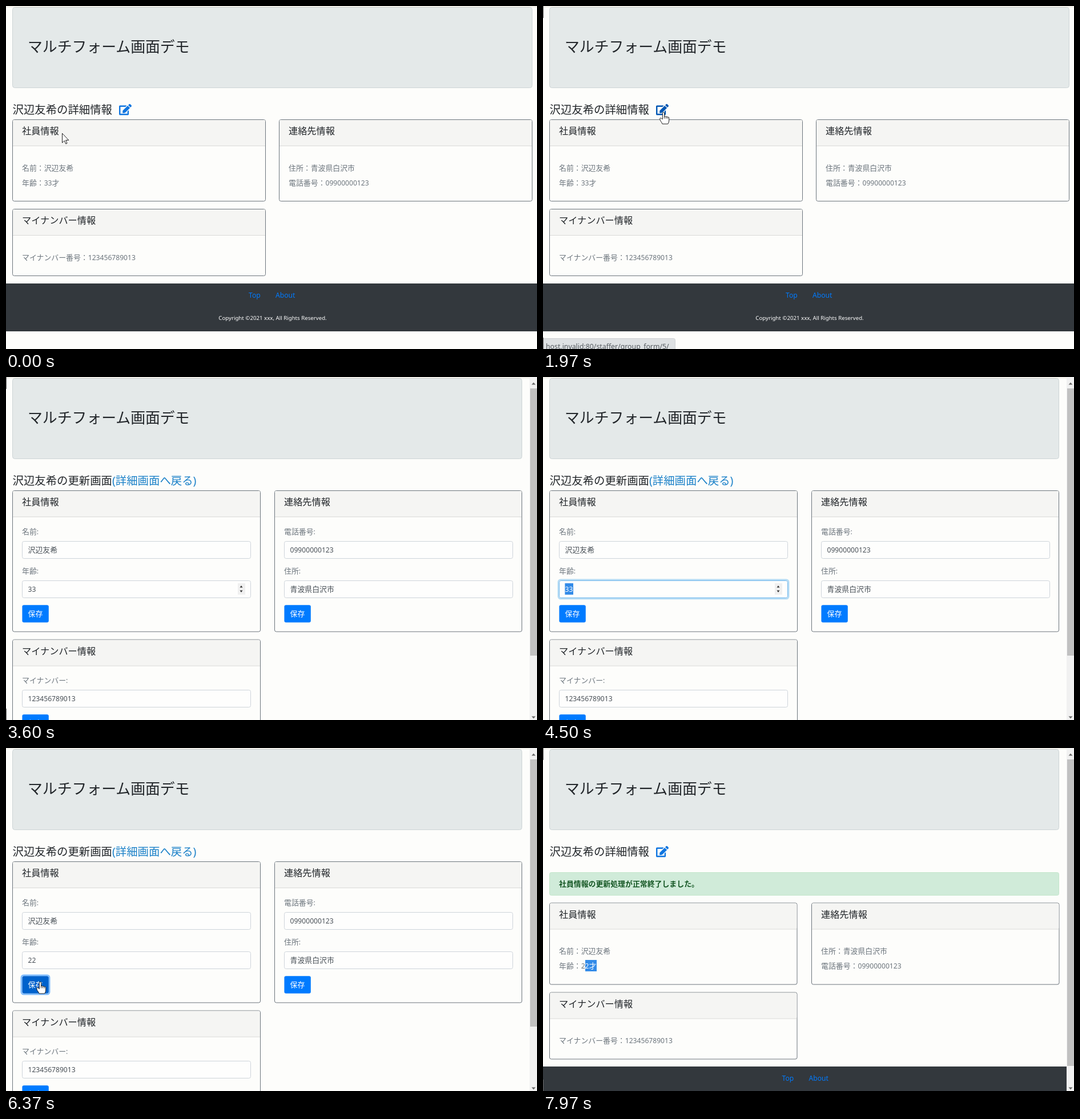
Animation of 930 by 602 pixels, one loop 8000 ms. Source, as an HTML page:

```html
<!DOCTYPE html>
<html lang="ja">
<head>
<meta charset="utf-8">
<style>
html, body { margin: 0; width: 930px; height: 602px; overflow: hidden; background: #fdfdfb; }
svg { display: block; }
text { font-family: "Noto Sans", "Noto Sans CJK JP", "Noto Sans CJK", sans-serif; white-space: pre; }
.latin { font-size: .94em; }
.light { font-weight: 300; }
</style>
</head>
<body>
<svg id="stage" width="930" height="602" viewBox="0 0 930 602"></svg>
<script>
const LOOP = 8000;
const PERSON = '沢辺友希', PHONE = '09900000123', PLACE = '青波県白沢市', NUMBER = '123456789013';
const INK = '#212529', GRAY = '#6c757d', FIELD = '#495057', BLUE = '#007bff', LINK = '#1a80c8';
const H1 = 25.85, H3 = 19.4, H5 = 16.2, BODY = 12.9;

// Latin runs are set slightly smaller than the kana and kanji around them.
const mix = s => s.replace(/[ -~©]+/g, m => `<tspan class="latin">${m}</tspan>`);
const text = (x, cy, size, s, fill = INK, attrs = '') =>
  `<text x="${x}" y="${cy + size * .37}" font-size="${size}" fill="${fill}" ${attrs}>${mix(s)}</text>`;
const rect = (x, y, w, h, fill, attrs = '') =>
  `<rect x="${x}" y="${y}" width="${w}" height="${h}" fill="${fill}" ${attrs}/>`;
const box = (x, y, w, h, fill, line, r = 3) =>
  rect(x + .5, y + .5, w - 1, h - 1, fill, `stroke="${line}" rx="${r}"`);
const group = (id, body, attrs = '') => `<g id="${id}" ${attrs}>${body}</g>`;

function card(x, y, w, h, title) {
  return box(x, y, w, h, '#fdfdfb', '#6c757d') +
    rect(x + 1, y + 1, w - 2, 45, '#f5f5f3', 'rx="2"') +
    rect(x + 1, y + 46, w - 2, 1, '#d9d9d8') +
    text(x + 17, y + 20.5, H5, title);
}

function header(right) {
  return rect(0, 0, 930, 602, '#fdfdfb') + rect(0, 1, 930, 1, '#e6e2d8') +
    box(11, 2, right - 11, 142, '#e4e9e9', '#cdd4d6', 4) +
    text(38, 71, H1, 'マルチフォーム画面デモ', INK, 'class="light"');
}

function footer(y, width) {
  const mid = width / 2;
  return rect(0, y, width, 84, '#33383d') +
    text(mid - 40, y + 20, BODY, 'Top', BLUE) +
    text(mid + 7, y + 20, BODY, 'About', BLUE) +
    text(mid + 2, y + 60, 10.3, 'Copyright ©2021 xxx, All Rights Reserved.', '#fff', 'text-anchor="middle"');
}

function scrollbar(end) {
  return rect(917, 0, 13, 602, '#f1f1f1') + rect(918, 20, 12, end - 20, '#c1c1c1') +
    '<path d="M920.5 13.500h7l-3.500-4zM920.5 595.500h7l-3.500 4z" fill="#6a6a6a"/>';
}

const editIcon = id => `<path id="${id}" transform="translate(198 172) scale(.0382)" fill="#0f75e0"
  d="M402.6 83.2l90.2 90.2c3.8 3.8 3.8 10 0 13.8L274.4 405.6l-92.8 10.3c-12.4 1.4-22.9-9.1-21.5-21.5l10.3-92.8L388.8 83.2c3.8-3.8 10-3.8 13.8 0zm162-22.9l-48.8-48.8c-15.2-15.2-39.9-15.2-55.2 0l-35.4 35.4c-3.8 3.8-3.8 10 0 13.8l90.2 90.2c3.8 3.8 10 3.8 13.8 0l35.4-35.4c15.2-15.3 15.2-40 0-55.2zM384 346.2V448H64V128h229.800c3.2 0 6.2-1.3 8.5-3.5l40-40c7.6-7.6 2.2-20.5-8.5-20.5H48C21.5 64 0 85.500 0 112v352c0 26.500 21.500 48 48 48h352c26.500 0 48-21.500 48-48V306.200c0-10.700-12.900-16-20.500-8.500l-40 40c-2.200 2.300-3.500 5.300-3.500 8.500z"/>`;

function detail(id, right, col, w, dy, age) {
  const x2 = col + 17;
  return header(right) +
    text(11.5, 182, H3, PERSON + 'の詳細情報', INK, 'class="light"') + editIcon(id + 'Icon') +
    card(11, 199 + dy, w, 144, '社員情報') +
    text(28, 284 + dy, BODY, '名前：' + PERSON, GRAY) +
    text(28, 310 + dy, BODY, `年齢：${age}才`, GRAY) +
    card(col, 199 + dy, w, 144, '連絡先情報') +
    text(x2, 284 + dy, BODY, '住所：' + PLACE, GRAY) +
    text(x2, 310 + dy, BODY, '電話番号：' + PHONE, GRAY) +
    card(11, 356 + dy, w, 118, 'マイナンバー情報') +
    text(28, 441 + dy, BODY, 'マイナンバー番号：' + NUMBER, GRAY);
}

const field = (x, y, label, value) =>
  text(x, y - 16.5, BODY, label, GRAY) + box(x, y, 401, 31, '#fefefd', '#ced4da') +
  text(x + 10.5, y + 15, BODY, value, FIELD);
const button = (x, y, id) =>
  rect(x + .4, y + .3, 46.4, 30.4, BLUE, `rx="3" id="${id}"`) + text(x + 10.5, y + 15, BODY, '保存', '#fff');

function edit() {
  return header(904) +
    `<text x="11.5" y="189" font-size="${H3}" fill="${INK}" class="light">${PERSON}の更新画面` +
    `<tspan id="back" fill="${LINK}">(詳細画面へ戻る)</tspan></text>` +
    card(11, 199, 435, 248.5, '社員情報') +
    field(28, 288, '名前:', PERSON) + field(28, 357, '年齢:', '') +
    group('focus',
      rect(26.8, 355.8, 403.4, 33.4, 'none', 'rx="4" stroke="#b5dcf5" stroke-width="2.5"') +
      box(28, 357, 401, 31, '#fefefd', '#74b8ec')) +
    group('spinner', rect(406, 362, 13, 20, '#f0f0f0') +
      '<path d="M409.500 369.500h5l-2.500-3.500zM409.500 374.500h5l-2.500 3.500z" fill="#333"/>') +
    rect(38.4, 362, 14.6, 20, '#338be8', 'id="ageMark"') +
    text(38.5, 372, BODY, '33', FIELD, 'id="age"') +
    rect(0, 364, 1, 16, '#333', 'id="caret"') +
    rect(26.8, 398.8, 49.4, 33.4, 'none', 'rx="4" stroke="#80bdff" stroke-width="2.5" id="ring"') +
    button(28, 400, 'save') +
    card(470, 199, 434, 248.5, '連絡先情報') +
    field(487, 288, '電話番号:', PHONE) + field(487, 357, '住所:', PLACE) + button(487, 400, 'save2') +
    card(11, 460.5, 435, 190, 'マイナンバー情報') +
    field(28, 549, 'マイナンバー:', NUMBER) + button(28, 592, 'save3') +
    scrollbar(489);
}

const statusBar = (id, w, url) => group(id,
  box(-2, 583, w + 2, 24, '#dee1e3', '#cfd2d4') + text(5, 597, 13.1, url, '#555b60'));

const arrow = '<path d="M.5.5V17L4.300 13.400L6.800 19L9 18L6.600 12.500H11.800Z" fill="#fff" stroke="#222"/>';
const hand = '<path d="M-1.600 1.500Q0-.800 1.600 1.500V8q1.500-1.200 2.900.3q1.500-.9 2.800.7q1.700-.6 2.400 1V15q0 3-2 6H-2q-1-3-3.300-5.500L-6.300 12.200q-.2-2 2-1.500L-1.600 12.700Z" fill="#fff" stroke="#222" stroke-linejoin="round"/>' +
  '<path d="M1.600 8v3.500M4.500 8.500v3M7.300 9.200v2.500" stroke="#222" fill="none"/>';

document.getElementById('stage').innerHTML =
  group('view', detail('view', 922, 478, 444, 0, 33) + footer(487, 930)) +
  group('edit', edit()) +
  group('done', detail('done', 904, 470, 434.5, 72.5, 22) +
    rect(74, 372, 20, 20, '#338be8', 'id="doneMark"') + group('doneSel', '') +
    box(11, 218, 893, 41, '#d0ebd9', '#c3e6cb', 3) +
    text(28, 238.5, BODY, '社員情報の更新処理が正常終了しました。', '#155724', 'font-weight="700"') +
    footer(559, 917) + scrollbar(558)) +
  statusBar('statusEdit', 232, 'host.invalid:80/staffer/group_form/5/') +
  statusBar('statusBack', 146, 'host.invalid:80/views/5/') +
  group('edge', rect(0, 0, 1, 21, '#666') + rect(0, 582, 1, 20, '#666')) +
  group('arrow', arrow) + group('hand', hand);

const $ = id => document.getElementById(id);
const show = (id, on) => $(id).setAttribute('visibility', on ? 'inherit' : 'hidden');
const set = (id, name, v) => $(id).setAttribute(name, v);
const ramp = (t, a, b) => Math.min(1, Math.max(0, (t - a) / (b - a)));
const between = (t, a, b) => t >= a && t < b;

// time, x, y, pointer shape from then on
const path = [
  [30, 98, 223, 'arrow'], [800, 540, 232, 'arrow'], [870, 540, 232, 'arrow'],
  [1250, 165, 380, 'arrow'], [1450, 165, 380, 'arrow'], [1800, 207, 194, 'hand'],
  [1900, 211, 186, 'hand'], [2520, 211, 186, 'hand'], [2700, 208, 200, 'hand'],
  [2740, 206, 206, 'arrow'], [3060, 85, 358, ''], [5500, 75, 386, ''],
  [5540, 74, 389, 'arrow'], [5720, 64, 402, 'hand'], [5850, 60, 410, 'hand'],
  [7170, 60, 410, 'arrow'], [7430, 70, 392, '']
];

function pointer(t) {
  let i = 0;
  while (i < path.length - 1 && path[i + 1][0] <= t) i++;
  const a = path[i], b = path[i + 1] || a;
  let k = ramp(t, a[0], b[0] + (a === b));
  if (b[0] - a[0] > 200) k = k * k * (3 - 2 * k);
  const at = `translate(${a[1] + (b[1] - a[1]) * k} ${a[2] + (b[2] - a[2]) * k})`;
  for (const shape of ['arrow', 'hand']) {
    show(shape, a[3] === shape);
    set(shape, 'transform', at);
  }
}

function draw(t) {
  show('view', t < 2400);
  show('edit', between(t, 2400, 6560));
  show('done', t >= 6560);
  pointer(t);

  show('edge', t >= 100 && (t + 400) % 1000 < 500);
  set('viewIcon', 'fill', between(t, 1800, 2400) ? '#0056b3' : '#0f75e0');
  show('statusEdit', between(t, 1830, 2400));
  show('statusBack', between(t, 2400, 2750));
  set('statusBack', 'opacity', 1 - ramp(t, 2620, 2750));
  const over = t < 2740;
  set('back', 'fill', over ? '#0a5c9c' : LINK);
  set('back', 'text-decoration', over ? 'underline' : 'none');

  const focused = between(t, 3800, 6150), marked = between(t, 4300, 4630);
  const value = t < 4630 ? '33' : t < 4700 ? '2' : '22';
  set('focus', 'opacity', ramp(t, 3800, 3950) * (1 - ramp(t, 6150, 6300)));
  show('spinner', between(t, 3060, 6150));
  show('ageMark', marked);
  $('age').innerHTML = mix(value);
  set('age', 'fill', marked ? '#fff' : FIELD);
  show('caret', focused && !marked && Math.floor((t - 4570) / 500) % 2 === 0);
  set('caret', 'x', 39 + value.length * 6.9);
  set('save', 'fill', t >= 6150 ? '#0062cc' : t >= 5720 ? '#0069d9' : BLUE);
  set('ring', 'opacity', ramp(t, 6150, 6300));

  const picked = t < 7870 ? 0 : t < 7930 ? 1 : 2;
  show('doneMark', picked);
  set('doneMark', 'width', picked === 1 ? 7 : 20);
  $('doneSel').innerHTML = picked ? text(73.6, 382.5, BODY, '2才'.slice(0, picked), '#fff') : '';
}

function tick() {
  draw(performance.now() % LOOP);
  requestAnimationFrame(tick);
}
tick();
</script>
</body>
</html>
```
